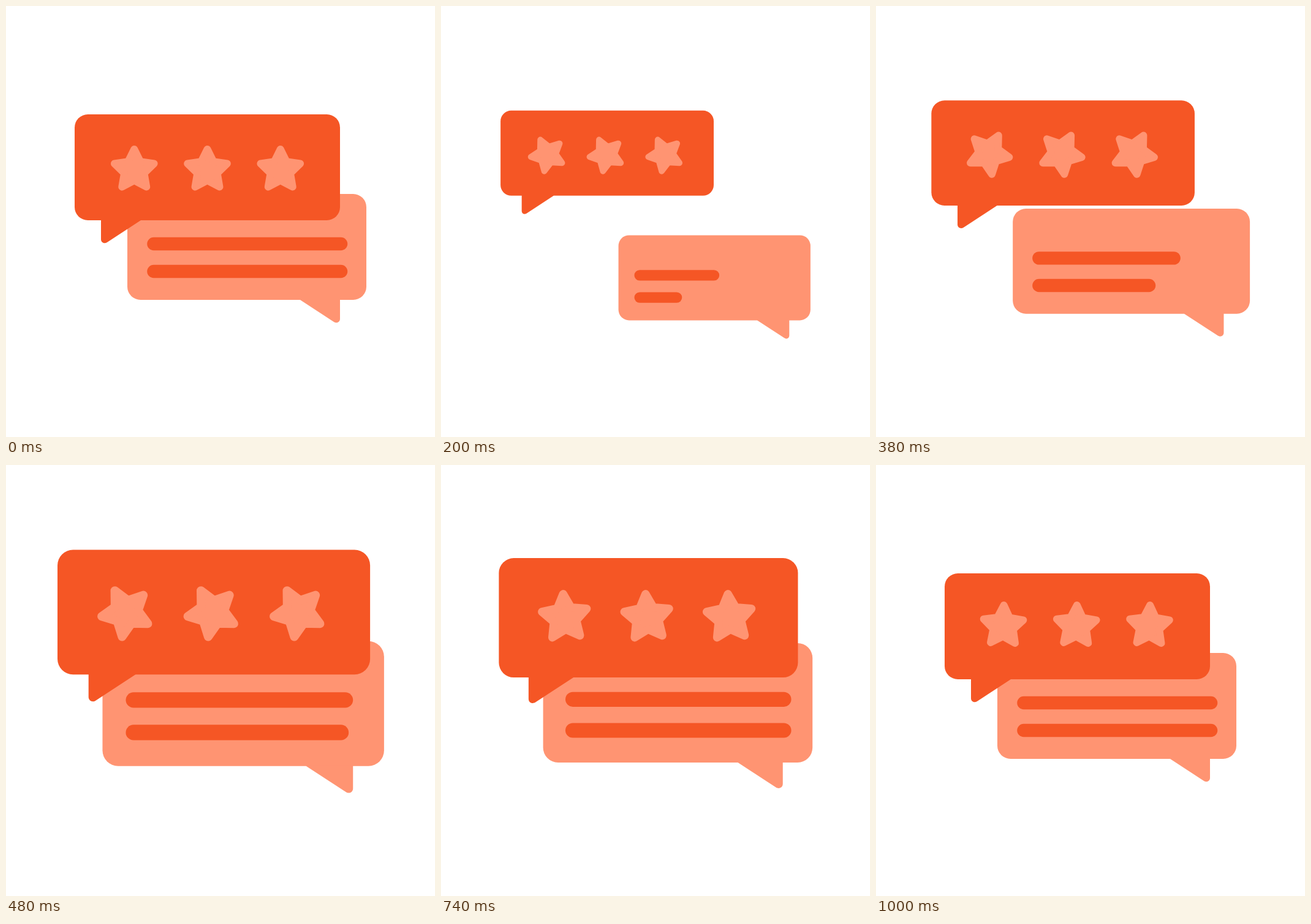
An HTML page with a canvas that plays this animation: 700x704 px, repeating every 1400 ms.

```html
<!DOCTYPE html>
<html lang="en">
<head>
<meta charset="utf-8">
<title>Review bubbles</title>
<style>
  html, body { margin: 0; height: 100%; overflow: hidden; background: #fff; }
  canvas { display: block; }
</style>
</head>
<body>
<canvas id="stage" width="700" height="704"></canvas>
<script>
const ctx = document.getElementById('stage').getContext('2d');
const RED = '#f55625', PINK = '#ff9472';
const LOOP = 1400, MOVE = 1000, STEP = 20;

// CSS-style cubic-bezier easing, solved by bisection
function bezier(x1, y1, x2, y2) {
  const at = (a, b, u) => 3 * (1 - u) ** 2 * u * a + 3 * (1 - u) * u * u * b + u ** 3;
  return x => {
    if (x <= 0) return 0;
    if (x >= 1) return 1;
    let lo = 0, hi = 1;
    for (let i = 0; i < 30; i++) {
      const mid = (lo + hi) / 2;
      if (at(x1, x2, mid) < x) lo = mid; else hi = mid;
    }
    return at(y1, y2, lo);
  };
}

const quick = bezier(.25, .1, .2, 1);
const smooth = bezier(1 / 3, 0, 2 / 3, 1);
const settle = bezier(.33, 0, .73, 1);

// Poses: scale, red centre, pink centre, how far the bars are shortened
const rest = { scale: 1, red: [328.5, 263.5], pink: [393, 393.5], cut: 0 };
const apart = { scale: .8, red: [270.1, 239.9], pink: [447.1, 444.8], cut: 1 };
const close = { scale: 1.21, red: [344.9, 240.4], pink: [382.1, 385.1], cut: 0 };
const moves = [
  { start: 0, end: 243, from: rest, to: apart, ease: quick },
  { start: 243, end: 529, from: apart, to: close, ease: smooth },
  { start: 529, end: MOVE, from: close, to: rest, ease: settle }
];

const mix = (a, b, p) => a + (b - a) * p;

function poseAt(t) {
  const { start, end, from, to, ease } = moves.find(m => t <= m.end);
  const p = ease((t - start) / (end - start));
  const point = key => from[key].map((v, i) => mix(v, to[key][i], p));
  return {
    scale: mix(from.scale, to.scale, p),
    red: point('red'),
    pink: point('pink'),
    cut: mix(from.cut, to.cut, p)
  };
}

function placed([x, y], scale, draw) {
  ctx.save();
  ctx.translate(x, y);
  ctx.scale(scale, scale);
  draw();
  ctx.restore();
}

// Rounded box with a tail; dir 1 slants the tail right, -1 left
function bubble(color, halfWidth, tailX, dir) {
  const h = 86.5, x = d => tailX + dir * d;
  ctx.fillStyle = color;
  ctx.beginPath();
  ctx.roundRect(-halfWidth, -h, halfWidth * 2, h * 2, 21.6);
  ctx.fill();
  ctx.beginPath();
  ctx.moveTo(x(0), h - 1);
  ctx.lineTo(x(0), h + 31);
  ctx.bezierCurveTo(x(0), h + 36.5, x(5.5), h + 39, x(10), h + 36);
  ctx.lineTo(x(65), h);
  ctx.lineTo(x(65), h - 1);
  ctx.fill();
}

function star(x, angle) {
  ctx.save();
  ctx.translate(x, 1.7);
  ctx.rotate(angle);
  ctx.translate(0, 2.7);
  ctx.beginPath();
  for (let i = 0; i < 10; i++) {
    const r = i % 2 ? 17 : 34, a = i * Math.PI / 5;
    ctx.lineTo(r * Math.sin(a), -r * Math.cos(a));
  }
  ctx.closePath();
  ctx.fillStyle = ctx.strokeStyle = PINK;
  ctx.lineWidth = 12;
  ctx.lineJoin = 'round';
  ctx.fill();
  ctx.stroke();
  ctx.restore();
}

function bar(y, length) {
  ctx.strokeStyle = RED;
  ctx.lineWidth = 21.5;
  ctx.lineCap = 'round';
  ctx.beginPath();
  ctx.moveTo(-152, y);
  ctx.lineTo(-152 + length, y);
  ctx.stroke();
}

function draw(t) {
  const { scale, red, pink, cut } = poseAt(t);
  const angle = quick(t / MOVE) * 145.5 * Math.PI / 180;
  ctx.fillStyle = '#fff';
  ctx.fillRect(0, 0, 700, 704);
  placed(pink, scale, () => {
    bubble(PINK, 195, 152, -1);
    bar(-5, 305.5 - 157 * cut);
    bar(40, 305.5 - 234 * cut);
  });
  placed(red, scale, () => {
    bubble(RED, 216.5, -173.5, 1);
    for (const i of [-1, 0, 1]) star(i * 119.25, angle);
  });
}

const begin = performance.now();
function frame() {
  const t = (performance.now() - begin) % LOOP;
  draw(Math.min(MOVE, Math.floor(t / STEP) * STEP));
  requestAnimationFrame(frame);
}
frame();
</script>
</body>
</html>
```
